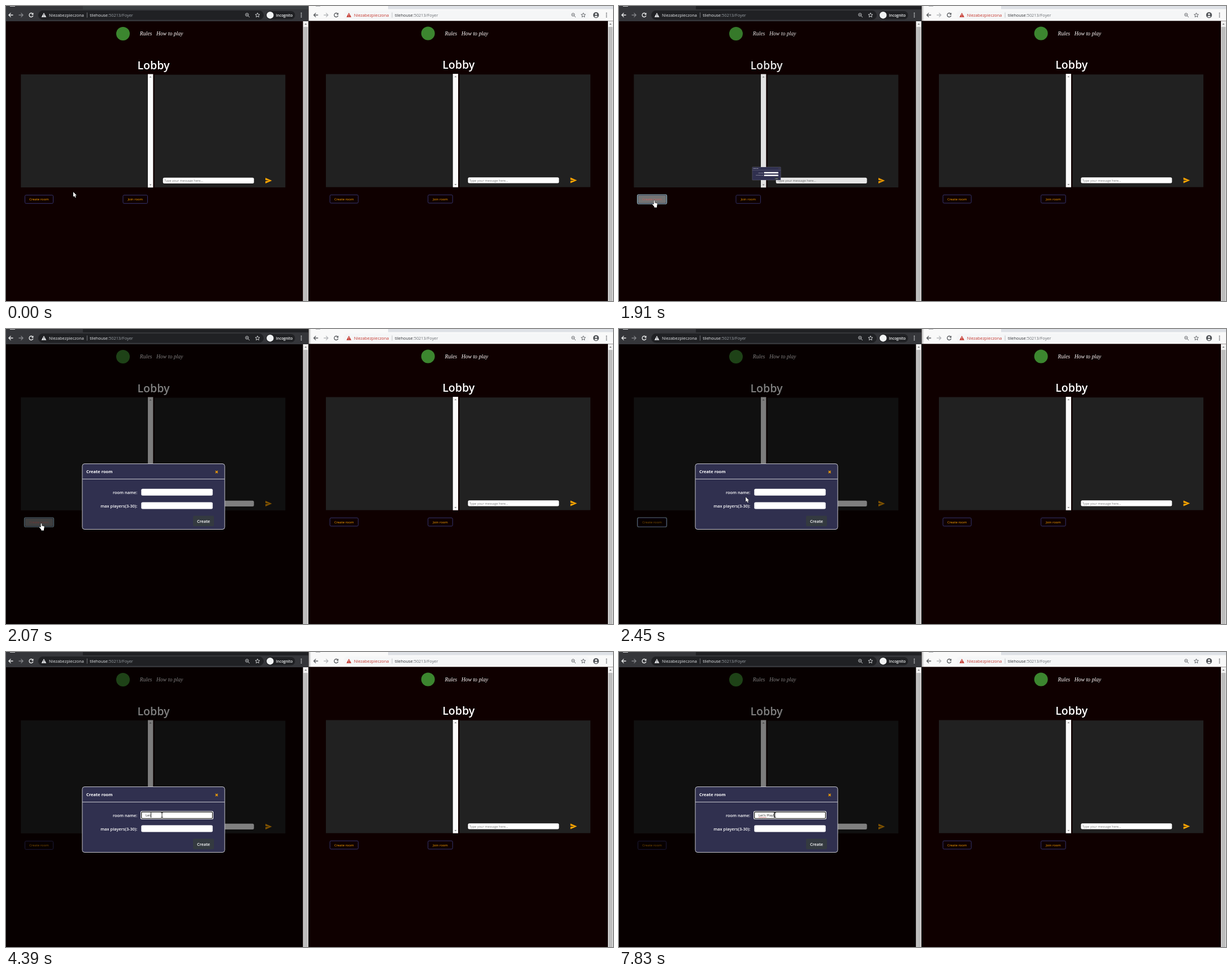
An HTML page with a canvas for the animation above (8 s loop, 1074 by 522 pixels).

```html
<!DOCTYPE html>
<html lang="en">
<head>
<meta charset="utf-8">
<title>Lobby</title>
<style>
html, body { margin: 0; width: 100%; height: 100%; overflow: hidden; background: #0f0000; }
canvas { display: block; }
</style>
</head>
<body>
<canvas id="stage" width="1074" height="522"></canvas>
<script>
const c = document.getElementById('stage').getContext('2d');
const LOOP = 8000;
const ORANGE = '#ffa500';
const SANS = '"Open Sans", "Noto Sans", sans-serif';
const KEYS = "Let's Play!";
const KEY_TIMES = [4070, 4240, 4390, 5340, 5410, 6110, 6980, 7210, 7360, 7530, 7830];
const PRESS = 1840, FOCUS = 2840;

const clamp = v => Math.max(0, Math.min(1, v));
const mix = (a, b, p) => a + (b - a) * p;
// Index of the screen refresh since `start`, -1 before it.
const tick = (t, start, gap = 77) => t < start ? -1 : Math.floor((t - start + 7) / gap);

function rect(x, y, w, h, color) {
  c.fillStyle = color;
  c.fillRect(x, y, w, h);
}

function round(x, y, w, h, r, fill, line, width = 1) {
  c.beginPath();
  c.roundRect(x, y, w, h, r);
  if (fill) { c.fillStyle = fill; c.fill(); }
  if (line) { c.strokeStyle = line; c.lineWidth = width; c.stroke(); }
}

function disc(x, y, r, color) {
  c.beginPath();
  c.arc(x, y, r, 0, 7);
  c.fillStyle = color;
  c.fill();
}

function shape(d, x, y, fill, line, width = 1) {
  const path = new Path2D(d);
  c.save();
  c.translate(x, y);
  if (line) { c.strokeStyle = line; c.lineWidth = width; c.stroke(path); }
  if (fill) { c.fillStyle = fill; c.fill(path); }
  c.restore();
}

function text(s, x, y, size, color, weight = 400, align = 'left', family = SANS) {
  c.font = `${weight} ${size}px ${family}`;
  c.textAlign = align;
  c.fillStyle = color;
  c.fillText(s, x, y);
}

function toolbar(x, look) {
  const { ink, faint, warn, host, path } = look;
  const back = 'M4 0H-3.5M0 -3.6L-3.6 0L0 3.6';
  shape(back, x + 8.5, 16, null, ink, 1.3);
  c.save();
  c.translate(x + 26.5, 16);
  c.scale(-1, 1);
  shape(back, 0, 0, null, faint, 1.3);
  c.restore();
  shape('M2.6 -2.4A3.5 3.5 0 1 0 3.4 1', x + 44.5, 16, null, ink, 1.3);
  shape('M4 -4.2V-.6H.4Z', x + 44.5, 16, ink);

  shape('M0 -4L4.3 3.7H-4.3Z', x + 67, 16, warn);
  rect(x + 66.5, 14.5, 1, 2.4, look.pill);
  rect(x + 66.5, 17.8, 1, 1, look.pill);
  text('Niezabezpieczona', x + 76, 19, 7.4, warn);
  rect(x + 143, 11.5, 0.8, 9, faint);
  text('tilehouse', x + 148.3, 19, 7.4, host);
  text(':50213/Foyer', x + 148.3 + c.measureText('tilehouse').width, 19, 7.4, path);
}

function toolIcons(zoomX, starX, dotsX, ink) {
  shape('M2 -.6A2.6 2.6 0 1 1 -3.2 -.6A2.6 2.6 0 1 1 2 -.6M1.2 1.3L4 4M-1.8 -.6H.6', zoomX, 16, null, ink, 0.9);
  shape('M0 -3.9L1.1 -1.2L3.9 -1L1.8 .9L2.4 3.6L0 2.1L-2.4 3.6L-1.8 .9L-3.9 -1L-1.1 -1.2Z', starX, 16, null, ink, 0.9);
  for (const dy of [-3.2, 0, 3.2]) disc(dotsX, 16 + dy, 0.95, ink);
}

function chromeDark(active) {
  rect(0, 0, 535, 27, '#35363a');
  rect(136, 0, 399, 6, active ? '#202124' : '#3c4043');
  rect(7, 0, 9, 1, '#c8c9cb');
  round(57, 8, 399, 16.5, 8.2, '#202124');
  toolbar(0, { ink: '#eeeff0', faint: '#85868a', warn: '#e8eaed', host: '#e8eaed', path: '#9aa0a6', pill: '#202124' });
  round(460, 9, 51.5, 14.5, 7.2, '#202124');
  disc(467.3, 16.2, 6.2, '#f1f3f4');
  text('Incognito', 477.8, 18.6, 6.5, '#f1f3f4', 600);
  toolIcons(427, 445, 522.5, '#dcdee0');
}

function chromeLight() {
  rect(535.5, 0, 538.5, 27, '#f9f9f9');
  rect(676, 0, 398, 5.5, '#dee1e6');
  rect(548, 0, 8, 1, '#b4b6b9');
  round(597, 8, 435, 16, 8, '#f5f6f7');
  toolbar(539.7, { ink: '#55585c', faint: '#b4b6b9', warn: '#c5352c', host: '#303236', path: '#6b6f74', pill: '#f5f6f7' });
  toolIcons(1004, 1021.5, 1062.5, '#55585c');
  disc(1044, 16, 5.2, '#55585c');
  disc(1044, 14.4, 1.7, '#f9f9f9');
  shape('M-3 2.9Q0 -.2 3 2.9Q0 5 -3 2.9Z', 1044, 16, '#f9f9f9');
}

function scrollbar(x, y, w) {
  rect(x, y, w, 522 - y, '#f1f1f1');
  shape('M-2 1L0 -1.2L2 1Z', x + w / 2, 32, '#777');
  rect(x + 0.8, 37, w - 1.6, 485, '#bdbdbd');
}

function button(label, x, w, hover = 0, focused = false) {
  if (focused) round(x - 1, 333.8, w + 2, 16.4, 2.5, null, '#a4c4c8', 1.2);
  round(x, 334.7, w, 14.6, 2, null, '#34346e');
  if (hover) {
    c.globalAlpha = hover;
    round(x, 334.7, w, 14.6, 2, '#808080', '#4c5f78');
    c.globalAlpha = 1;
  }
  const tint = `rgb(${mix(255, 226, hover)},${mix(165, 108, hover)},${mix(0, 104, hover)})`;
  text(label, x + w / 2, 344.1, 5.9, tint, 400, 'center');
}

function page(hover, focused) {
  const serif = '"Liberation Serif", serif';
  disc(207, 49, 12, '#3c862f');
  text('Rules', 236.8, 52, 9.7, '#fff', 'italic 400', 'left', serif);
  text('How to play', 266, 52, 9.7, '#fff', 'italic 400', 'left', serif);
  text('Lobby', 261, 111.7, 19.6, '#fff', 600, 'center');

  rect(26.3, 121, 225, 200, '#212121');
  rect(251, 120.5, 9.3, 200.7, '#fafafa');
  shape('M-2 1L0 -1.2L2 1Z', 255.6, 125.5, '#8a8a8a');
  shape('M-2 -1L0 1.2L2 -1Z', 255.6, 316.5, '#8a8a8a');
  rect(262.6, 121.6, 231.7, 199.4, '#212121');
  round(277.7, 303.8, 161, 10.2, 2.5, '#fff');
  text('Type your message here...', 280, 311, 5.67, '#757575');
  shape('M0 0L11.5 5L0 10V6L7 5L0 4Z', 459, 304, ORANGE);

  button('Create room', 33.5, 50, hover, focused);
  button('Join room', 207, 43.5);
}

function dialog(p, t) {
  c.save();
  c.translate(261, 296.5);
  c.scale(p, p);
  c.translate(-261, -296.5);
  round(135, 238.5, 252, 116, 4, '#30304f', '#c4c4cc');
  rect(135, 265, 252, 1, '#c4c4cc');
  text('Create room', 142, 255.4, 7.5, '#fff', 700);
  shape('M-2 -2L2 2M2 -2L-2 2', 372.7, 253, null, ORANGE, 1.3);
  text('room name:', 232.3, 291.7, 7.4, '#fff', 600, 'right');
  text('max players(3-30):', 232.3, 315.5, 7.4, '#fff', 600, 'right');
  if (t >= FOCUS) {
    round(238, 281.6, 129, 14.4, 2.5, '#fff');
    round(239.6, 283.1, 125.8, 11.4, 1.5, '#fff', '#101010', 1.2);
  } else {
    round(239.3, 282.8, 126.4, 12, 2.5, '#fff');
  }
  round(239.3, 306.5, 126.4, 12, 2.5, '#fff');
  round(331, 330.5, 37, 18.5, 2, '#343a40');
  text('Create', 349.5, 342.5, 7.3, '#fff', 600, 'center');
  if (t >= FOCUS) typing(t);
  c.restore();
}

function typing(t) {
  const count = KEY_TIMES.filter(k => k <= t).length;
  const typed = KEYS.slice(0, count);
  text(typed, 247, 290.8, 6, '#222');
  const end = 247 + c.measureText(typed).width;
  if (count > 5) {
    const width = c.measureText("Let's").width;
    for (let x = 0; x < width; x += 2) rect(247 + x, 292 + x / 2 % 2 * 0.5, 1.4, 0.7, '#e04040');
  }
  const last = count ? KEY_TIMES[count - 1] : FOCUS - 90;
  if (Math.floor((t - last) / 550) % 2 === 0) rect(Math.round(end), 284, 1, 9, '#111');
}

function pointer(t) {
  const toButton = clamp((tick(t, 440, 76) + 1) / 8);
  const toField = Math.sin(clamp((tick(t, 2148) + 1) / 7 + 0) * Math.PI / 2);
  if (t >= 2680) {
    const p = clamp((tick(t, 2680, 80) + 1) / 3);
    const nudge = t >= 3070 ? 5 : t >= 2990 ? 2 : 0;
    return { x: mix(242, 271, p) + nudge, y: mix(292, 288.5, p), kind: 'beam' };
  }
  if (toField > 0) {
    return { x: mix(62, 242, toField), y: mix(344, 292, toField), kind: toField === 1 ? 'beam' : 'arrow' };
  }
  if (toButton === 1) return { x: 62, y: 344, kind: 'hand' };
  const q = 1 - toButton;
  const bend = (a, b, d) => q * q * a + 2 * q * toButton * b + toButton * toButton * d;
  return { x: bend(119, 130, 62), y: bend(329, 435, 344), kind: 'arrow' };
}

function drawPointer({ x, y, kind }) {
  if (kind === 'arrow') {
    shape('M0 0V8.6L2 6.9L3.4 10L4.8 9.4L3.4 6.3H6Z', x, y, '#fff', '#000', 0.9);
  } else if (kind === 'hand') {
    shape('M0 .6Q1 -.4 1.8 .6V4.2L5.4 5Q6.4 5.4 6.2 6.6L5.4 10.4V12.4H.8V11L-2.6 7Q-2.4 5.6 -1.2 6.2L0 7.2Z', x - 0.4, y, '#fff', '#000', 1);
  } else {
    shape('M-1.7 -4H1.7M0 -4V4M-1.7 4H1.7', x, y, null, '#111', 0.9);
  }
}

function draw(t) {
  const at = pointer(t);
  const hover = at.kind === 'hand' ? clamp((t - 960) / 150) : 0;
  const shown = PRESS + 77 * tick(t, PRESS);
  const open = t < PRESS ? 0 : (1 - Math.cos(Math.PI * clamp((shown - 1858) / 200))) / 2;

  rect(0, 0, 1074, 522, '#0f0000');
  page(hover, t >= PRESS && t < FOCUS);
  if (open) {
    rect(0, 27, 525.5, 495, `rgba(0,0,0,${open / 2})`);
    dialog(open, t);
  }
  chromeDark(t >= PRESS);
  scrollbar(525.5, 27, 9.5);

  c.save();
  c.translate(539.7, -0.5);
  page(0, false);
  c.restore();
  chromeLight();
  rect(535.5, 26.3, 538.5, 0.7, '#0f0000');
  scrollbar(1065, 26.5, 9);
  if (t >= PRESS) {
    const shade = c.createLinearGradient(535, 0, 540, 0);
    shade.addColorStop(0, 'rgba(0,0,0,.3)');
    shade.addColorStop(1, 'rgba(0,0,0,0)');
    rect(535, 0, 5, 522, shade);
  }
  drawPointer(at);
}

function loop() {
  draw(performance.now() % LOOP);
  requestAnimationFrame(loop);
}
loop();
</script>
</body>
</html>
```
